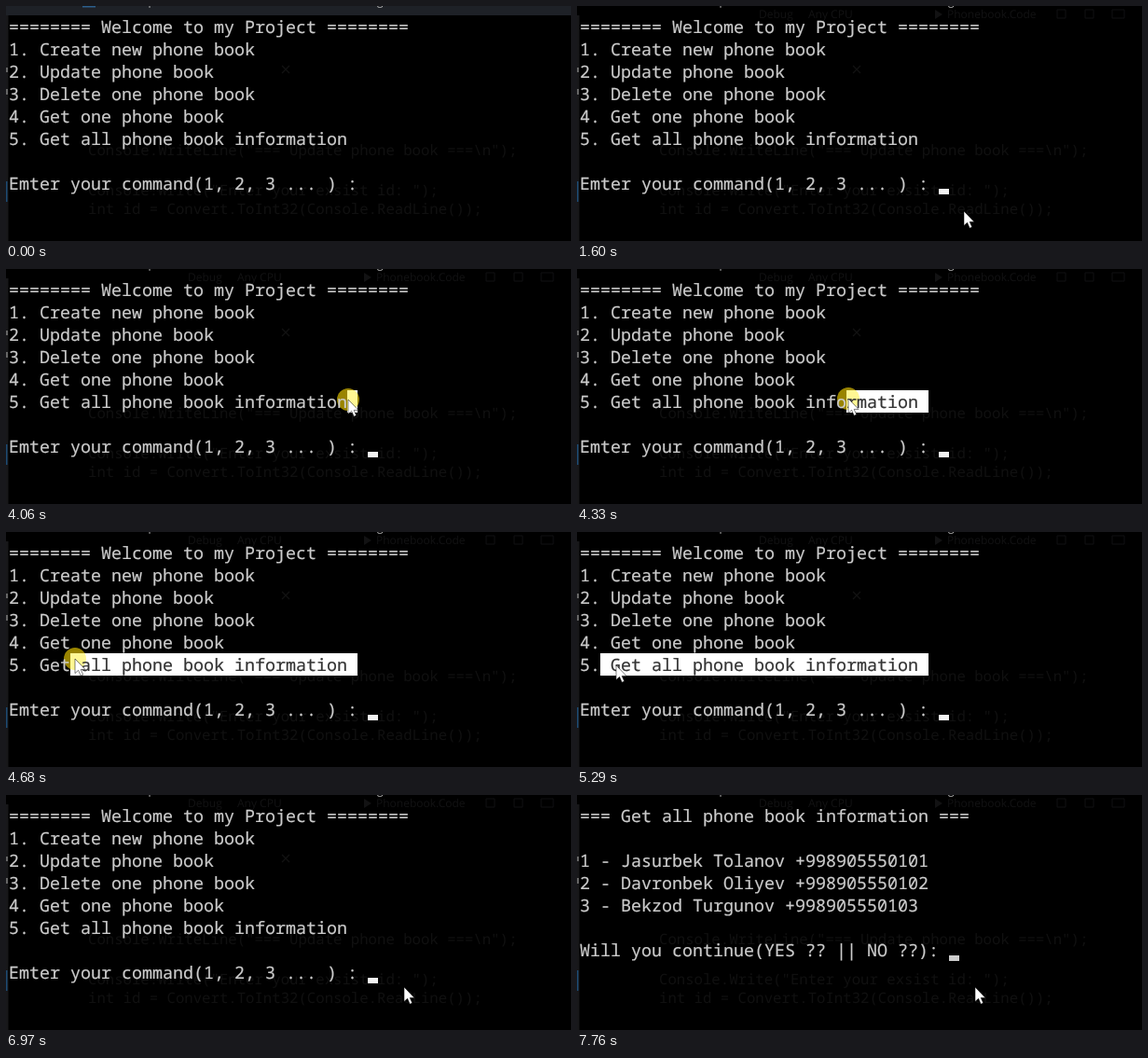
Write an HTML page that moves like this. It is 606 by 252 pixels and loops after 8 s.

```html
<!DOCTYPE html>
<html lang="en">
<head>
<meta charset="utf-8">
<title>Phone book console</title>
<style>
  html, body { margin: 0; width: 100%; height: 100%; overflow: hidden; background: #000; }
  svg { display: block; width: 606px; height: 252px; }
  text { white-space: pre; text-rendering: geometricPrecision; }
  .mono { font: 18.333px "Noto Sans Mono", monospace; fill: #ccc; stroke: #ccc; stroke-width: .2; }
  .dark { fill: #333; stroke: #333; }
  .code { font: 15.667px "Noto Sans Mono", monospace; fill: #101010; }
  .ui { font: 12px "Open Sans", sans-serif; fill: #121213; }
  .path { font: 12px "Open Sans", sans-serif; fill: #bbb; }
</style>
</head>
<body>
<svg viewBox="0 0 606 252">
  <defs><clipPath id="selClip"><rect id="clipBox" y="130" height="24"/></clipPath></defs>
  <rect width="606" height="252"/>
  <g id="idle">
    <rect width="606" height="10" fill="#1e2127"/>
    <rect x="82" width="14" height="1.5" fill="#2c5f8c"/>
  </g>
  <rect y="10" width="2.5" height="242" fill="#18181a"/>
  <rect y="188" width="1.5" height="22" fill="#1d4a73"/>
  <path d="M0 66h2v5h-2zM0 89h2v6h-2z" fill="#666"/>
  <g id="toolbar" class="ui">
    <text x="195" y="13">Debug</text>
    <text x="248" y="13">Any CPU</text>
    <path d="M384 4l8 5l-8 5z"/>
    <text x="397" y="13">Phonebook.Code</text>
    <path d="M515 4h9v9h-9zM545 4h9v9h-9zM574 4h13v9h-13z" fill="none" stroke="#111113"/>
  </g>
  <path d="M296 64l8 8m0-8l-8 8" stroke="#121212" stroke-width="1.3"/>
  <g class="code">
    <text x="88" y="160">Console.WriteLine("=== Update phone book ===\n");</text>
    <text x="88" y="203">Console.Write("Enter your exsist id: ");</text>
    <text x="88" y="223">int id = Convert.ToInt32(Console.ReadLine());</text>
  </g>
  <text class="path" x="84" y="-1">C:\source\repos\Phonebook\Phonebook.Code\bin\Debug\Phonebook.exe</text>
  <g id="menu" class="mono"></g>
  <g id="heading" class="mono"></g>
  <g id="list" class="mono"></g>
  <circle id="under" r="12" fill="#ffdc00" opacity=".6"/>
  <g id="lineFive" class="mono"></g>
  <g id="selection" clip-path="url(#selClip)">
    <rect y="130" width="606" height="24" fill="#fff"/>
    <circle id="over" r="12" fill="#ffec00" opacity=".42"/>
    <g id="inverse" class="mono dark"></g>
  </g>
  <rect id="caret" width="11" height="6"/>
  <path id="mouse" d="M0 0V15.5L3.6 12.3L6.2 18.2L8.7 17.1L6.2 11.4H11Z" fill="#fff" stroke="#000" stroke-width=".5"/>
</svg>
<script>
const LOOP = 8000, CELL = 11, ROW = 24, LEFT = 3, TOP = 10;
const FOCUS = 1070, PRESS = 4060, RELEASE = 5160, DESELECT = 6180, TYPE = 7300, ENTER = 7700;
const $ = id => document.getElementById(id);
const colX = col => LEFT + col * CELL;

function print(group, row, text, col = 0) {
  const el = document.createElementNS("http://www.w3.org/2000/svg", "text");
  el.setAttribute("x", colX(col));
  el.setAttribute("y", TOP + row * ROW + 19);
  el.textContent = text;
  $(group).append(el);
  return el;
}

[
  "======== Welcome to my Project ========",
  "1. Create new phone book",
  "2. Update phone book",
  "3. Delete one phone book",
  "4. Get one phone book"
].forEach((line, row) => print("menu", row, line));
print("menu", 7, "Emter your command(1, 2, 3 ... ) :");
const typed = print("menu", 7, "5", 35);
for (const layer of ["lineFive", "inverse"]) print(layer, 5, "5. Get all phone book information");

print("heading", 0, "=== Get all phone book information ===");
[
  "1 - Jasurbek Tolanov +998905550101",
  "2 - Davronbek Oliyev +998905550102",
  "3 - Bekzod Turgunov +998905550103"
].forEach((line, i) => print("list", i + 2, line));
print("list", 6, "Will you continue(YES ?? || NO ??):");

// Each move eases the pointer on to a new point
const moves = [
  { from: 390, to: 670, x: 415, y: 220 },
  { from: 1600, to: 2010, x: 407, y: 204 },
  { from: 2540, to: 2810, x: 209, y: 131 },
  { from: 2880, to: 3310, x: 363, y: 143 },
  { from: 3510, to: 3720, x: 367, y: 140 },
  { from: PRESS, to: 4680, x: 74, y: 136 },
  { from: 4680, to: 4960, x: 33, y: 141 },
  { from: RELEASE, to: 5910, x: 427, y: 206 }
];
const SAMPLE = 68;
const ease = u => u * u * (3 - 2 * u);

function pointer(t) {
  let x = 425, y = 230;
  for (const m of moves) {
    if (t < m.from) break;
    const steps = Math.round((m.to - m.from) / SAMPLE);
    const u = Math.floor((t - m.from) / (m.to - m.from) * steps) / steps;
    const k = ease(Math.min(1, u));
    x += (m.x - x) * k;
    y += (m.y - y) * k;
  }
  return [Math.round(x), Math.round(y)];
}

const show = (id, on) => $(id).style.display = on ? "" : "none";
const place = (id, x, y) => $(id).setAttribute("transform", `translate(${x} ${y})`);

function drawCaret(t, selected) {
  const done = t >= ENTER;
  const beat = Math.floor((t - 1063) / 537);
  show("caret", done || selected || (beat > 0 && beat % 2));
  place("caret", colX(t >= TYPE ? 36 : 35), TOP + (done ? 7 : 8) * ROW - 6);
  $("caret").setAttribute("fill", done ? "#ccc" : "#f4f4f4");
}

function draw(t) {
  const [x, y] = pointer(t);
  show("mouse", t >= moves[0].from);
  place("mouse", x, y);

  const focus = t < FOCUS ? 0 : t < FOCUS + 130 ? .5 : 1;
  $("idle").style.opacity = 1 - focus;
  $("toolbar").style.opacity = focus;

  for (const id of ["under", "over"]) {
    show(id, t >= PRESS && t < RELEASE);
    place(id, x, y);
  }

  const selected = t >= PRESS && t < DESELECT;
  show("selection", selected);
  if (selected) {
    const edge = pointer(Math.min(t, RELEASE - 1))[0];
    const start = colX(Math.floor((edge - LEFT) / CELL));
    $("clipBox").setAttribute("x", start);
    $("clipBox").setAttribute("width", colX(34) - start);
  }

  show("menu", t < ENTER);
  show("lineFive", t < ENTER);
  show("heading", t >= ENTER);
  show("list", t >= ENTER + 60);
  typed.style.display = t >= TYPE ? "" : "none";
  drawCaret(t, selected);
}

const began = performance.now();
function tick() {
  draw((performance.now() - began) % LOOP);
  requestAnimationFrame(tick);
}
tick();
</script>
</body>
</html>
```
